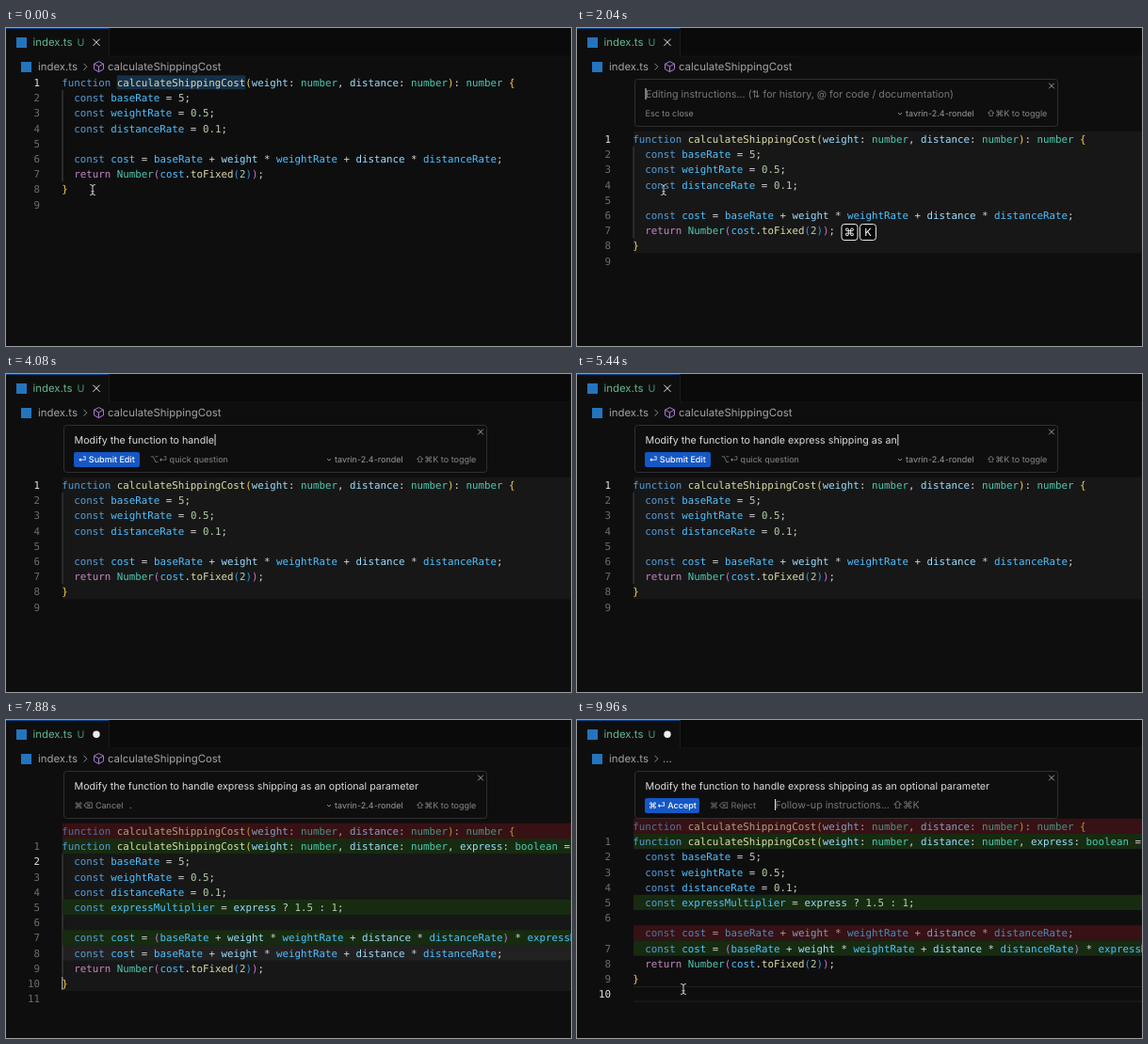
An HTML page that plays this animation: 600x338 px, repeating every 10 s.

```html
<!DOCTYPE html>
<html lang="en">
<head>
<meta charset="utf-8">
<title>Inline edit</title>
<style>
  html, body { margin: 0; width: 100%; height: 100%; overflow: hidden; background: #0e0e0f; }
  svg { display: block; width: 100vw; height: 100vh; }
  text { white-space: pre; text-rendering: geometricPrecision; font-family: Inter, "DejaVu Sans", sans-serif; }
  .code text { font: 10.8px "DejaVu Sans Mono", monospace; fill: #d4d4d4; }
  .code .num { fill: #6a6d72; text-anchor: end; }
  .code .num.on { fill: #e4e4e4; }
  .code .kw { fill: #569cd6; } .code .ret { fill: #c586c0; } .code .fn { fill: #dcdcaa; }
  .code .type { fill: #4ec9b0; } .code .const { fill: #4fc1ff; } .code .param { fill: #9cdcfe; }
  .code .val { fill: #b5cea8; }
  .code .b0 { fill: #f2cf4a; } .code .b1 { fill: #cf73cf; } .code .b2 { fill: #2f96ec; }
  .ui { font-size: 11.4px; }
  .ask { font-size: 10.7px; }
  .small { font-size: 9px; }
  .line { fill: none; stroke-width: 1; }
</style>
</head>
<body>
<svg id="stage" viewBox="0 0 600 338" preserveAspectRatio="none"></svg>
<script>
const LOOP = 10000, ROW = 16.2, ADV = 6.5, LEFT = 59.3;
const T = { select: 400, keys: 880, open: 1320, type: 2400, submit: 6960, first: 7120,
            second: 7480, third: 7700, done: 8400, keysOut: 2240 };
const PROMPT = 'Modify the function to handle express shipping as an optional parameter';
const stage = document.getElementById('stage');

const rect = (x, y, w, h, fill, more = '') =>
  `<rect x="${x}" y="${y}" width="${w}" height="${h}" fill="${fill}" ${more}/>`;
const label = (x, y, s, cls, fill, more = '') =>
  `<text x="${x}" y="${y}" class="${cls}" fill="${fill}" ${more}>${s}</text>`;
const path = (d, color, more = '') => `<path class="line" d="${d}" stroke="${color}" ${more}/>`;
const group = (id, body, more = '') => `<g id="${id}" ${more}>${body}</g>`;

// Syntax colouring
const WORDS = {
  kw: ['function', 'const', 'false'], ret: ['return'],
  fn: ['calculateShippingCost', 'toFixed'], type: ['number', 'boolean', 'Number'],
  param: ['weight', 'distance', 'express']
};
const wordClass = w => Object.keys(WORDS).find(k => WORDS[k].includes(w)) || 'const';

function paint(src) {
  let depth = /^ /.test(src) ? 1 : 0;
  return src.replace(/[A-Za-z]+|[\d.]*\d|[(){}]/g, s => {
    let cls;
    if (/[A-Za-z]/.test(s)) cls = wordClass(s);
    else if (/\d/.test(s)) cls = 'val';
    else if (s === '(') cls = 'b' + depth++;
    else if (s === ')') cls = 'b' + --depth;
    else cls = 'b0';
    return `<tspan class="${cls}">${s}</tspan>`;
  });
}

// Code: a leading "-" or "+" marks a removed or added row
const HEAD = 'function calculateShippingCost(weight: number, distance: number';
const OLD = HEAD + '): number {';
const NEW = HEAD + ', express: boolean = false): number {';
const RATES = ['  const baseRate = 5;', '  const weightRate = 0.5;', '  const distanceRate = 0.1;'];
const SUM = 'baseRate + weight * weightRate + distance * distanceRate';
const COST = `  const cost = ${SUM};`;
const COST2 = `+  const cost = (${SUM}) * expressMultiplier;`;
const MULT = '+  const expressMultiplier = express ? 1.5 : 1;';
const END = ['  return Number(cost.toFixed(2));', '}', ''];

const before = [OLD, ...RATES, '', COST, ...END];
const swapped = ['-' + OLD, '+' + NEW, ...RATES];
const step1 = [...swapped, '', COST, ...END];
const step2 = [...swapped, MULT, '', COST, ...END];
const step3 = [...swapped, MULT, '', COST2, COST, ...END];
const after = [...swapped, MULT, '', '-' + COST, COST2, ...END];

function code(id, rows, y0, o = {}) {
  const top = i => y0 - 8.2 + i * ROW;
  let back = '', text = '', n = 0;
  if (o.block) back += rect(60, top(o.block[0]), 540, (o.block[1] - o.block[0]) * ROW, '#171717');
  if (o.pending) back += rect(60, top(o.pending), 540, ROW, '#212122');
  if (o.current) back += path(`M60 ${top(o.current) + .5}H600M60 ${top(o.current) + ROW}H600`, '#202021');
  if (o.guide) back += path(`M60 ${top(o.guide[0])}V${top(o.guide[1])}`, o.guideColor || '#4a4a4a');
  if (o.word) back += rect(LEFT + 9 * ADV, top(0) + .5, 21 * ADV, 15, '#14304a');
  rows.forEach((row, i) => {
    const mark = /^[-+]/.test(row) ? row[0] : '';
    const src = mark ? row.slice(1) : row;
    const y = y0 + i * ROW + 3.9;
    if (mark) back += rect(60, top(i), 540, ROW, mark === '-' ? '#371114' : '#162b10');
    if (o.selected && i < 8)
      back += rect(LEFT, top(i), (src.length + (i < 7 ? 1 : 0)) * ADV, ROW, '#1b3b5e');
    text += `<text x="${LEFT}" y="${y}" ${mark === '-' ? 'opacity=".7"' : ''}>${paint(src)}</text>`;
    if (mark !== '-') {
      n++;
      text += `<text x="36" y="${y}" class="num ${n === o.active ? 'on' : ''}">${n}</text>`;
    }
  });
  if (o.caret) text += rect(LEFT + o.caret[1] * ADV, top(o.caret[0]) + 1, 1, 14, '#c8c8c8');
  return group(id, back + text, 'class="code"');
}

const codeViews = [
  ['plain', 0, before, 58, { active: 1, guide: [1, 7], word: true }],
  ['picked', T.select, before, 58, { active: 8, guide: [1, 7], selected: true, caret: [7, 1] }],
  ['asked', T.open, before, 118, { active: 1, guide: [1, 7], guideColor: '#4c3f3f', block: [0, 8] }],
  ['diff1', T.first, step1, 118, { active: 2, guide: [2, 8], block: [2, 9], pending: 2, caret: [8, 0] }],
  ['diff2', T.second, step2, 118, { active: 2, guide: [2, 9], block: [2, 10], pending: 7, caret: [9, 0] }],
  ['diff3', T.third, step3, 118, { active: 2, guide: [2, 10], block: [2, 11], pending: 8, caret: [10, 0] }],
  ['final', T.done, after, 113, { active: 10, current: 11 }]
];

// Window chrome
const GREY = '#85868a';
const cross = (x, y, r, color) =>
  path(`M${x - r} ${y - r}l${2 * r} ${2 * r}M${x + r} ${y - r}l${-2 * r} ${2 * r}`, color);
const cube = path('M98.5 35.6l5 2.6v5.6l-5 2.8-5-2.8v-5.6zM93.5 38.2l5 2.6 5-2.6M98.5 40.8v5.8', '#a77bd0');

const header =
  rect(0, 0, 600, 30, '#0a0a0b') + rect(0, 0, 109, 31, '#0e0e0f') + rect(0, 0, 109, 1, '#0b4385') +
  path('M109.5 0V30', '#1b1b1c') + path('M110 30H600', '#151516') +
  rect(11, 10, 11, 11, '#2474bd') + label(28.5, 19.3, 'index.ts', 'ui', '#62b88a') +
  label(75.5, 19, 'U', 'small', '#4d9a70', 'style="font-size:10.5px"') +
  group('close', cross(96, 15.3, 3.6, '#e6e6e6')) +
  group('dirty', '<circle cx="96" cy="15.3" r="3.7" fill="#eee"/>') +
  rect(16, 36, 11, 11, '#2474bd') + label(34, 45, 'index.ts', 'ui', '#a3a3a3') +
  path('M82.5 37.8l3.4 3.4-3.4 3.4', '#8a8a8a') +
  group('symbol', cube + label(108, 45, 'calculateShippingCost', 'ui', '#a3a3a3')) +
  group('dots', label(91, 45, '...', 'ui', '#a3a3a3'));

// Prompt box
const button = (w, x, s) => rect(72, 83, w, 16, '#1557c5', 'rx="2"') +
  label(x, 94.3, s, 'small', '#fff', 'font-weight="500"');
const popup = group('popup',
  rect(61.5, 54.5, 449, 50, '#0e0e0f', 'rx="3" stroke="#303032"') + cross(504, 61.5, 2.8, '#a0a0a0') +
  group('model', path('M341 90l2 2 2-2', GREY, 'stroke-width=".8"') +
    label(349, 94.3, 'tavrin-2.4-rondel', 'small', '#9a9a9c') +
    label(435, 94.3, '⇧⌘K to toggle', 'small', GREY)) +
  group('empty',
    label(73, 74, 'Editing instructions... (⇅ for history, @ for code / documentation)', 'ask', '#77787b') +
    label(72.5, 94.3, 'Esc to close', 'small', GREY)) +
  label(72.5, 74, '', 'ask', '#dcdcdc', 'id="typed"') +
  group('submit', button(70, 76.5, '⏎ Submit Edit') + label(153, 94.3, '⌥⏎ quick question', 'small', GREY)) +
  group('cancel', label(72.5, 94.3, '⌘⌫ Cancel', 'small', GREY) +
    label(131, 94.3, '.', 'small', '#b0b0b0', 'id="wait"')) +
  group('accept', button(58, 76, '⌘⏎ Accept') + label(141, 94.3, '⌘⌫ Reject', 'small', '#77787b') +
    label(210.5, 93.8, 'Follow-up instructions... ⇧⌘K', 'ask', '#77787b')) +
  rect(0, 0, 1, 12, '#e0e0e0', 'id="caret"'));

const keycap = (x, s) => rect(x, 208.5, 17, 17, '#050505', 'rx="3" stroke="#e8e8e8"') +
  label(x + 8.5, 221, s, 'ui', '#fff', 'text-anchor="middle"');
const keys = group('keys', keycap(281, '⌘') + keycap(300.5, 'K'));

const beam = 'M-2.8 -5.5Q0 -5.5 0 -3.8Q0 -5.5 2.8 -5.5M0 -4V4M-2.8 5.5Q0 5.5 0 3.8Q0 5.5 2.8 5.5M-1.5 1.8H1.5';
const mouse = group('mouse', path(beam, '#111', 'style="stroke-width:2.4"') + path(beam, '#cfcfcf'));

stage.innerHTML = rect(0, 0, 600, 338, '#0e0e0f') +
  codeViews.map(([id, , rows, y, o]) => code(id, rows, y, o)).join('') + header + popup + keys + mouse;

const el = {};
stage.querySelectorAll('[id]').forEach(e => el[e.id] = e);
const show = (id, on) => { el[id].style.display = on ? '' : 'none'; };
const within = (t, a, b) => t >= a && t < b;
const clamp = (v, a, b) => Math.min(b, Math.max(a, v));

// Pointer path: time, x, y
const MOVES = [[8440, 92, 172], [8680, 96, 193], [9000, 109, 262], [9300, 113, 286]];
function pointer(t) {
  const i = MOVES.findIndex(m => m[0] > t);
  if (i === 0) return MOVES[0].slice(1);
  if (i < 0) return MOVES[MOVES.length - 1].slice(1);
  const [a, b] = [MOVES[i - 1], MOVES[i]];
  const k = (t - a[0]) / (b[0] - a[0]);
  return [a[1] + (b[1] - a[1]) * k, a[2] + (b[2] - a[2]) * k];
}

function placeCaret(t, typing) {
  const blink = (t + 300) % 1000 < 500 || within(t, 1700, T.type);
  let x = 72.5, y = 64;
  if (typing) x = 73 + el.typed.getComputedTextLength();
  else if (t >= T.done) { x = 210; y = 84; }
  el.caret.setAttribute('x', x);
  el.caret.setAttribute('y', y);
  show('caret', typing || (blink && !within(t, T.submit, T.done)));
}

function draw(t) {
  codeViews.forEach(([id, start], i) =>
    show(id, within(t, start, i + 1 < codeViews.length ? codeViews[i + 1][1] : LOOP)));

  const typing = within(t, T.type, T.submit), done = t >= T.done;
  show('popup', t >= T.open);
  show('model', !done);
  show('empty', t < T.type);
  show('submit', typing);
  show('cancel', within(t, T.submit, T.done));
  show('accept', done);
  show('dirty', t >= T.first);
  show('close', t < T.first);
  show('symbol', !done);
  show('dots', done);

  const count = t < T.type ? 0 : clamp(Math.floor(29.5 + (t - 4080) * .017), 0, PROMPT.length);
  el.typed.textContent = PROMPT.slice(0, count);
  el.wait.textContent = '.'.repeat(1 + Math.floor(Math.max(0, t - T.submit) / 300) % 3);
  placeCaret(t, typing);

  show('keys', within(t, T.keys, T.keysOut + 160));
  el.keys.style.opacity = clamp(Math.min((t - T.keys) / 120, 1 - (t - T.keysOut) / 160), 0, 1);

  show('mouse', t < T.type || done);
  el.mouse.setAttribute('transform', `translate(${pointer(t)})`);
}

const begin = performance.now();
function tick(now) {
  draw(Math.max(0, now - begin) % LOOP);
  requestAnimationFrame(tick);
}
draw(0);
requestAnimationFrame(tick);
</script>
</body>
</html>
```
